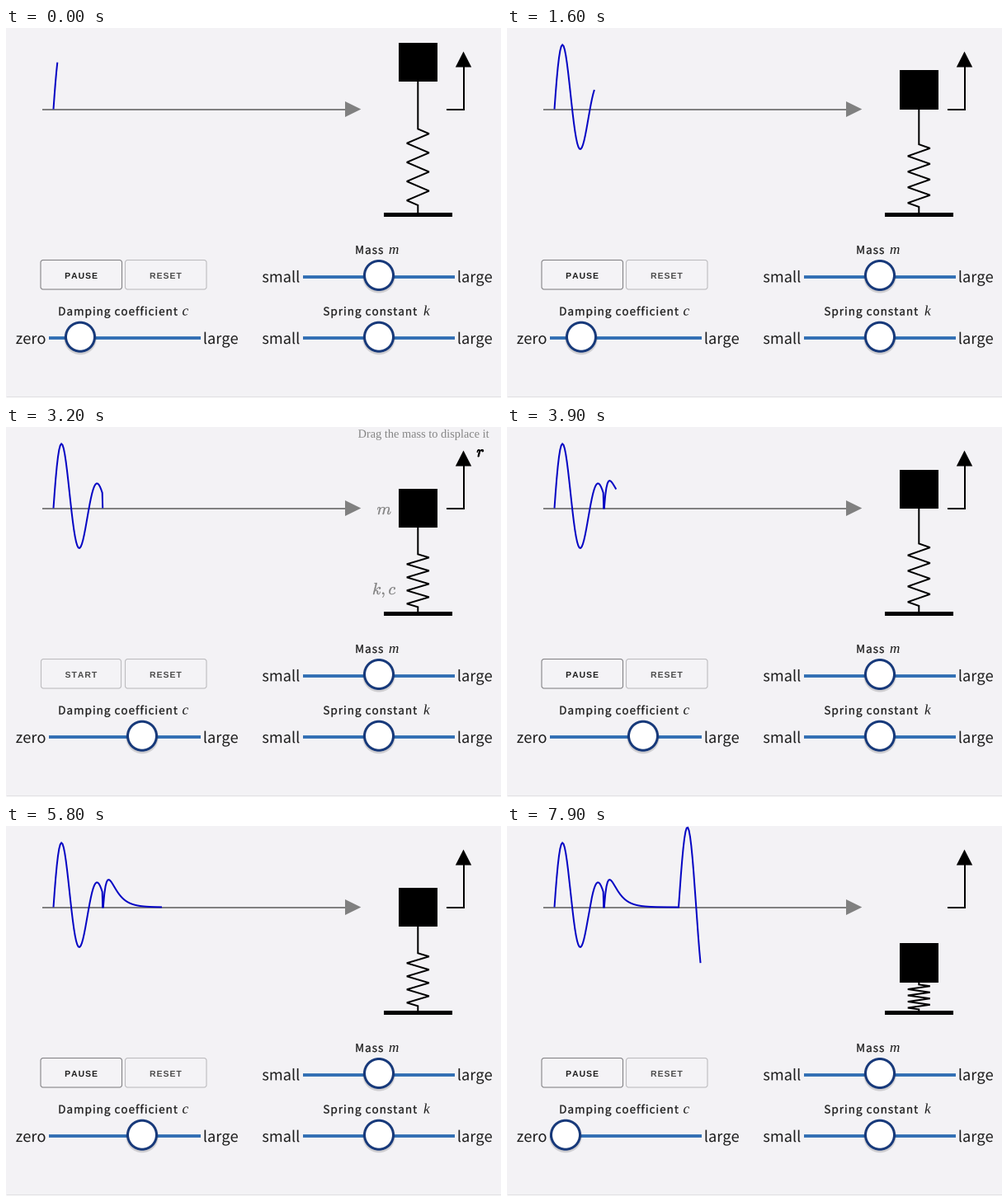
A matplotlib script for the animation above (8 s loop, 600 by 450 pixels).

```python
import numpy as np
import matplotlib.pyplot as plt
from matplotlib.animation import FuncAnimation
from matplotlib.patches import Circle, FancyBboxPatch, PathPatch, Polygon, Rectangle
from matplotlib.path import Path
from matplotlib.textpath import TextPath

W, H, DPI = 600, 450, 100
FRAMES, STEP = 80, 100
PX = 72 / DPI  # one pixel in points

BG, GRAY, TRACE = "#f3f2f5", "#808080", "#0505c4"
TRACK, RING = "#2f6db3", "#17397a"
SANS = dict(family="Noto Sans CJK JP")
BOLD = dict(family="Liberation Sans", weight="bold")
SERIF = dict(family="Liberation Serif")
ITALIC = dict(family="Liberation Serif", style="italic")
MATH = dict(family="DejaVu Sans", math_fontfamily="cm")

AXIS_Y, BASE_Y, MASS_X, MASS = 98.5, 226, 499.3, 47.5
OMEGA, KICK, SPEED = 0.1476, 14.3, 29.8  # rad/px, px/px, px/s
PAUSES = ((2.0, 3.4), (6.4, 7.0))

fig = plt.figure(figsize=(W / DPI, H / DPI), dpi=DPI, facecolor=BG)
ax = fig.add_axes([0, 0, 1, 1])
ax.set(xlim=(0, W), ylim=(H, 0))
ax.axis("off")


def line(xs, ys, color="black", width=2.0, z=2, **kw):
    return ax.plot(xs, ys, color=color, lw=width * PX, zorder=z,
                   solid_capstyle="butt", solid_joinstyle="miter", **kw)[0]


def shape(patch, z=2):
    patch.set_zorder(z)
    return ax.add_patch(patch)


def advance(ch, size, font):
    def right(s):
        return TextPath((0, 0), s, size=size, prop=font).get_extents().x1
    return right("|" + ch + "|") - right("||")


def text(x, y, s, size, font, color="black", track=0.0, anchor=0.0, bold=0.0):
    """Outline text; x is the ink's left (0), middle (.5) or right (1) edge."""
    if track:
        parts, pen = [], 0.0
        for ch in s:
            if ch != " ":
                parts.append(TextPath((pen, 0), ch, size=size, prop=font))
            pen += advance(ch, size, font) + track
        verts = np.concatenate([p.vertices for p in parts])
        codes = np.concatenate([p.codes for p in parts])
    else:
        p = TextPath((0, 0), s, size=size, prop=font)
        verts, codes = p.vertices, p.codes
    box = Path(verts, codes).get_extents()
    dx = x - box.x0 - anchor * box.width
    path = Path(verts * [1, -1] + [dx, y], codes)
    return shape(PathPatch(path, fc=color, ec=color, lw=bold * PX), 6)


def button(x0, x1, edge):
    y0, y1 = 281.5, 317
    return shape(FancyBboxPatch((x0 + 3, y0 + 3), x1 - x0 - 6, y1 - y0 - 6,
                                boxstyle="round,pad=3", fc="#f4f3f6",
                                ec=edge, lw=1.1 * PX))


def slider(x, y, knob, low):
    line([x, x + 184], [y, y], TRACK, 3.8)
    text(x - 4.5, y + 6.7, low, 18.2, SANS, "#1c1c1c", anchor=1)
    text(x + 188.5, y + 6.7, "large", 18.2, SANS, "#1c1c1c")
    discs = [shape(Circle((knob, y - 1.7 + dy), r, fc="black", ec="none", alpha=a), 3)
             for dy, r, a in ((1.6, 20.2, 0.05), (2.2, 19.2, 0.1))]
    discs.append(shape(Circle((knob, y - 1.7), 17.5, fc="white", ec=RING, lw=3 * PX), 4))
    return discs


def caption(x, y, name, xs, symbol):
    text(x, y, name, 13.5, SANS, "#1c1c1c", track=1.0, bold=0.3)
    text(xs, y, symbol, 17.3, ITALIC, "#1c1c1c")


# page bottom
shape(Rectangle((0, 446.5), W, 4, fc="#fcfcfd", ec="none"), 1)
line([0, W], [446.5, 446.5], "#e0dfe2", 1)

# time axis and direction arrow
line([44, 413], [AXIS_Y, AXIS_Y], GRAY)
shape(Polygon([(411, 89), (411, 108), (430.3, 98.5)], fc=GRAY, ec="none"))
line([534, 554.5, 554.5], [AXIS_Y, AXIS_Y, 46])
shape(Polygon([(544.8, 47.5), (564.2, 47.5), (554.5, 28.5)], fc="black", ec="none"))

# oscillator
shape(Rectangle((458, 223.5), 83, 5, fc="black", ec="none"))
spring = line([], [])
mass = shape(Rectangle((MASS_X - MASS / 2, 0), MASS, MASS, fc="black", ec="none"), 3)
trace = line([], [], TRACE, 2, 3)

# controls
run_box = button(42, 140.5, "#858487")
idle_box = button(42.5, 139.5, "#bdbcbf")
button(144.5, 243, "#bdbcbf")
pause = text(91.2, 304, "PAUSE", 10.4, BOLD, "#1f1f1f", track=1, anchor=0.5)
start = text(91, 304, "START", 10.4, BOLD, "#4c4c4c", track=1, anchor=0.5)
text(193.7, 304, "RESET", 10.4, BOLD, "#4c4c4c", track=1, anchor=0.5)

caption(424.5, 274, "Mass", 464.5, "m")
caption(64.5, 348.5, "Damping coefficient", 214, "c")
caption(385, 348.5, "Spring constant", 506.5, "k")
slider(360, 301.7, 452, "small")
slider(360, 376.4, 452, "small")
damper = slider(52, 376.4, 90, "zero")

hints = [
    text(427, 12.8, "Drag the mass to displace it", 14.35, SERIF, "#858585"),
    text(450, 106, "$m$", 20, MATH, GRAY, bold=0.3),
    text(445, 203, "$k, c$", 20, MATH, GRAY, bold=0.3),
    text(571, 36, "$r$", 19, MATH, bold=0.9),
]


def response(s, zeta):
    """Displacement after an impulse, for any damping ratio."""
    root = np.sqrt(complex(zeta * zeta - 1))
    wave = np.sinh(OMEGA * root * s) / (OMEGA * root)
    return KICK * np.exp(-zeta * OMEGA * s) * wave.real if zeta > 1 else \
        KICK * np.exp(-zeta * OMEGA * s) * np.real(wave)


def runs(t):
    """Start x, distance drawn and damping ratio of each run begun by time t."""
    yield 57.5, np.interp(t, [0, 0.9, 1.967], [4.8, 27.7, 59.2]), 0.15
    if t >= 3.4:
        yield 117.8, SPEED * max(0, min(t, 6.42) - 3.413), 1.1
    if t >= 7.0:
        yield 208, SPEED * max(0, t - 7.01), 0.0


def update(i):
    t = i * STEP / 1000
    idle = any(a - 1e-6 <= t < b - 1e-6 for a, b in PAUSES)

    xs, ys = [], []
    for x0, dist, zeta in runs(t):
        if xs:
            xs.append(xs[-1] + 0.5)
            ys.append(AXIS_Y)
        s = np.linspace(0, dist, int(dist / 1.4) + 2)
        xs.extend(x0 + s)
        ys.extend(AXIS_Y - response(s, zeta))
    if idle:
        xs.append(xs[-1] + 0.5)
        ys.append(AXIS_Y)
    trace.set_data(xs, ys)

    y = ys[-1]
    mass.set_y(y - MASS / 2)
    span = BASE_Y - y
    top, low = BASE_Y - 0.562 * span, BASE_Y - 0.06 * span
    coil = top + (np.arange(8) + 0.5) * (low - top) / 8
    side = np.where(np.arange(8) % 2, -13.5, 13.5)
    spring.set_data(MASS_X + np.r_[0, 0, side, 0, 0],
                    np.r_[y, top, coil, low, BASE_Y])

    knob = np.interp(t, [2.0, 2.2, 6.5, 6.8], [90, 165, 165, 71])
    for disc in damper:
        disc.center = knob, disc.center[1]

    for artist in [*hints, idle_box, start]:
        artist.set_visible(idle)
    for artist in (run_box, pause):
        artist.set_visible(not idle)
    return []


anim = FuncAnimation(fig, update, frames=FRAMES, interval=STEP,
                     init_func=lambda: update(0), repeat=True,
                     repeat_delay=0, blit=False)
plt.show()
```
